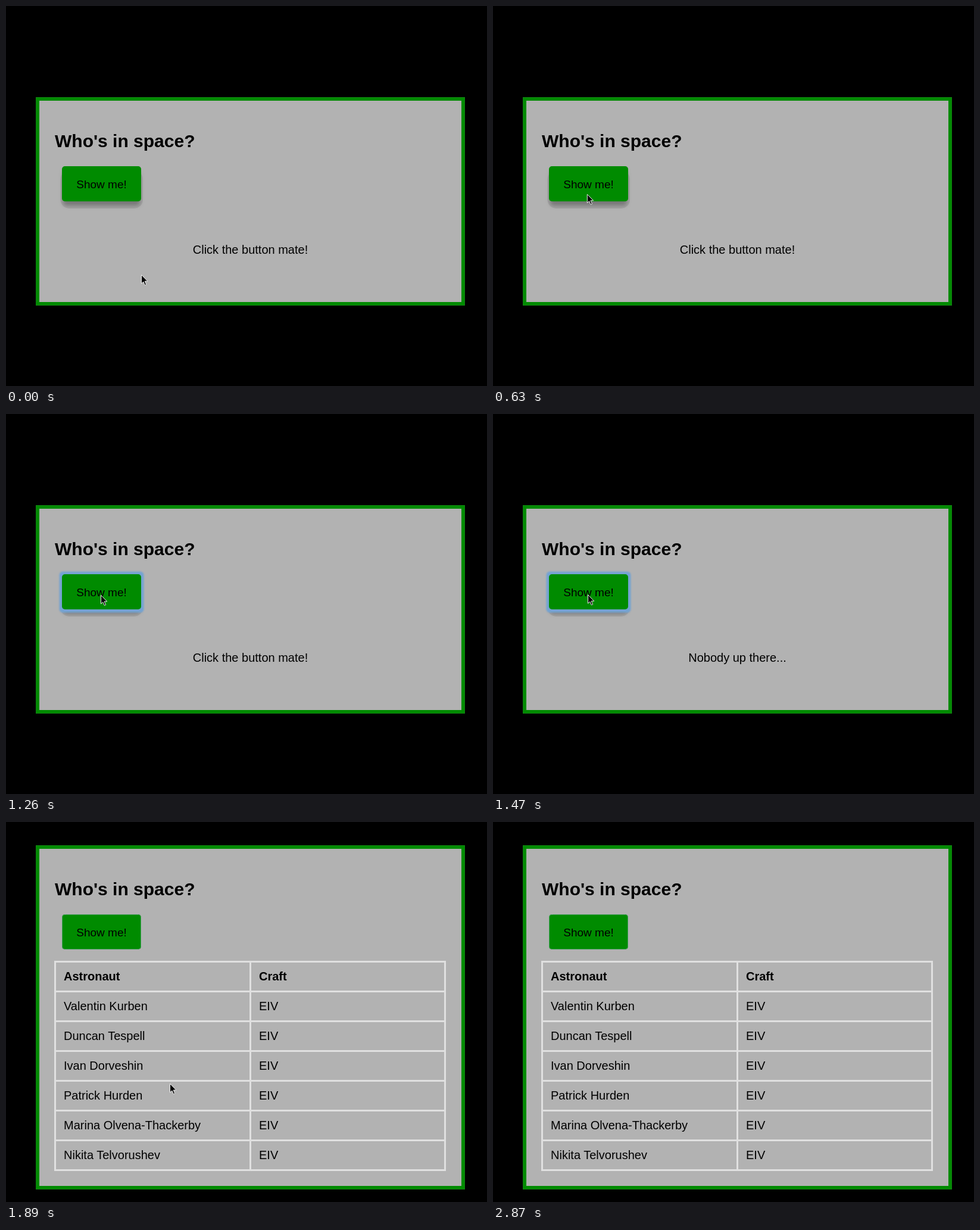
Recreate the animation shown at these times as an HTML page. Size 808 by 638 pixels, loop 2940 ms.

```html
<!DOCTYPE html>
<html lang="en">
<head>
<meta charset="utf-8">
<title>Who's in space?</title>
<style>
  html, body { margin: 0; width: 100%; height: 100%; overflow: hidden; background: #000; }
  svg { display: block; width: 808px; height: 638px; }
  text { font: 20px "Liberation Sans", Arial, Helvetica, sans-serif; }
  .bold { font-weight: bold; }
  #title { font-size: 30px; font-weight: bold; }
  #label { font-size: 19px; }
  #label, #message { text-anchor: middle; }
  #grid { fill: none; stroke: #e0e0e0; stroke-width: 3; }
  #soft { filter: blur(3px); }
  #ring { filter: blur(.8px); }
</style>
</head>
<body>
<svg viewBox="0 0 808 638">
  <rect id="edge" x="50" width="721" fill="#128212"/>
  <rect id="border" x="51" width="719" fill="#008b00"/>
  <rect id="panel" x="56" width="709" fill="#b2b2b2"/>

  <g id="head">
    <text id="title" x="82" y="237">Who's in space?</text>
    <g id="shadow">
      <rect x="91.5" y="276" width="138.5" height="64" rx="15" fill="#a2a2a2"/>
      <rect id="soft" x="96" y="276" width="129" height="59" rx="6" fill="#777"/>
    </g>
    <rect id="ring" x="89.5" y="264.5" width="142" height="69" rx="6" fill="#74a3d2"/>
    <rect x="94" y="269" width="133" height="59" rx="5" fill="#008b00"/>
    <rect id="trim" x="94.5" y="269.5" width="132" height="58" rx="4.5" fill="none"
          stroke="#86b0b4" stroke-dasharray="1 1"/>
    <text id="label" x="160.5" y="306">Show me!</text>
  </g>

  <text id="message" x="410.5" y="416"></text>

  <g id="table">
    <path id="grid"/>
    <g id="cells"></g>
  </g>

  <path id="arrow" d="M0 0V14.5L3.3 11.5L5.8 17.2L8.1 16.2L5.7 10.6H10.3Z"
        fill="#000" stroke="#eee" stroke-width="1"/>
  <path id="beam" d="M-3.5 -7.5H-2Q0 -7.5 0 -5.5Q0 -7.5 2 -7.5H3.5M0 -5.5V5.5M-3.5 7.5H-2Q0 7.5 0 5.5Q0 7.5 2 7.5H3.5M-2 3H2"
        fill="none" stroke="#333" stroke-width="1"/>
</svg>
<script>
const LOOP = 2940, STEP = 70;
const FOCUS_AT = 1260, CLICK_AT = 1330, LOADED_AT = 1540;

const rows = [
  ["Astronaut", "Craft"],
  ["Valentin Kurben", "EIV"],
  ["Duncan Tespell", "EIV"],
  ["Ivan Dorveshin", "EIV"],
  ["Patrick Hurden", "EIV"],
  ["Marina Olvena-Thackerby", "EIV"],
  ["Nikita Telvorushev", "EIV"],
];

// Pointer stops: time, x, y
const path = [
  [0, 227, 451], [70, 225, 446], [210, 200, 398], [420, 164, 332],
  [560, 158, 317], [910, 157, 310], [1190, 159, 304], [1470, 159, 303],
  [1540, 160, 306], [1680, 162, 308], [2100, 388, 570], [2240, 396, 582],
  [2310, 398, 588], [2520, 412, 645], [LOOP, 412, 645],
];

const $ = id => document.getElementById(id);
const show = (id, on) => $(id).setAttribute("visibility", on ? "visible" : "hidden");
const move = (id, x, y) => $(id).setAttribute("transform", `translate(${x} ${y})`);

function buildTable() {
  let lines = "M82.5 233V586M410.5 233V586M737.5 233V586";
  for (let i = 0; i <= rows.length; i++) lines += `M81 ${234.5 + 50 * i}H739`;
  $("grid").setAttribute("d", lines);
  $("cells").innerHTML = rows.map((row, i) => row.map((cell, col) =>
    `<text class="${i ? "" : "bold"}" x="${97 + 328 * col}" y="${266 + 50 * i}">${cell}</text>`
  ).join("")).join("");
}

function setBox(id, top, bottom, inset) {
  $(id).setAttribute("y", top + inset);
  $(id).setAttribute("height", bottom - top - 2 * inset);
}

function pointerAt(t) {
  const i = path.findIndex((p, n) => t < path[n + 1][0]);
  const [t0, x0, y0] = path[i], [t1, x1, y1] = path[i + 1];
  const k = (t - t0) / (t1 - t0);
  return [x0 + (x1 - x0) * k, y0 + (y1 - y0) * k];
}

function draw(t) {
  const loaded = t >= LOADED_AT;
  const top = loaded ? 39 : 153, bottom = loaded ? 617 : 503;
  setBox("edge", top, bottom, 0);
  setBox("border", top, bottom, 1);
  setBox("panel", top, bottom, 6);
  move("head", 0, loaded ? -114 : 0);

  show("shadow", !loaded);
  show("ring", !loaded && t >= FOCUS_AT);
  show("trim", loaded);
  show("table", loaded);
  show("message", !loaded);
  $("message").textContent = t < CLICK_AT ? "Click the button mate!" : "Nobody up there...";

  const [x, y] = pointerAt(t);
  const overText = loaded && t < 1750;
  show("beam", overText);
  show("arrow", !overText);
  move("beam", x + .5, y + .5);
  move("arrow", x + .5, y + .5);
}

buildTable();
const start = performance.now();
function tick() {
  const t = (performance.now() - start) % LOOP;
  draw(Math.floor(t / STEP) * STEP);
  requestAnimationFrame(tick);
}
tick();
</script>
</body>
</html>
```
